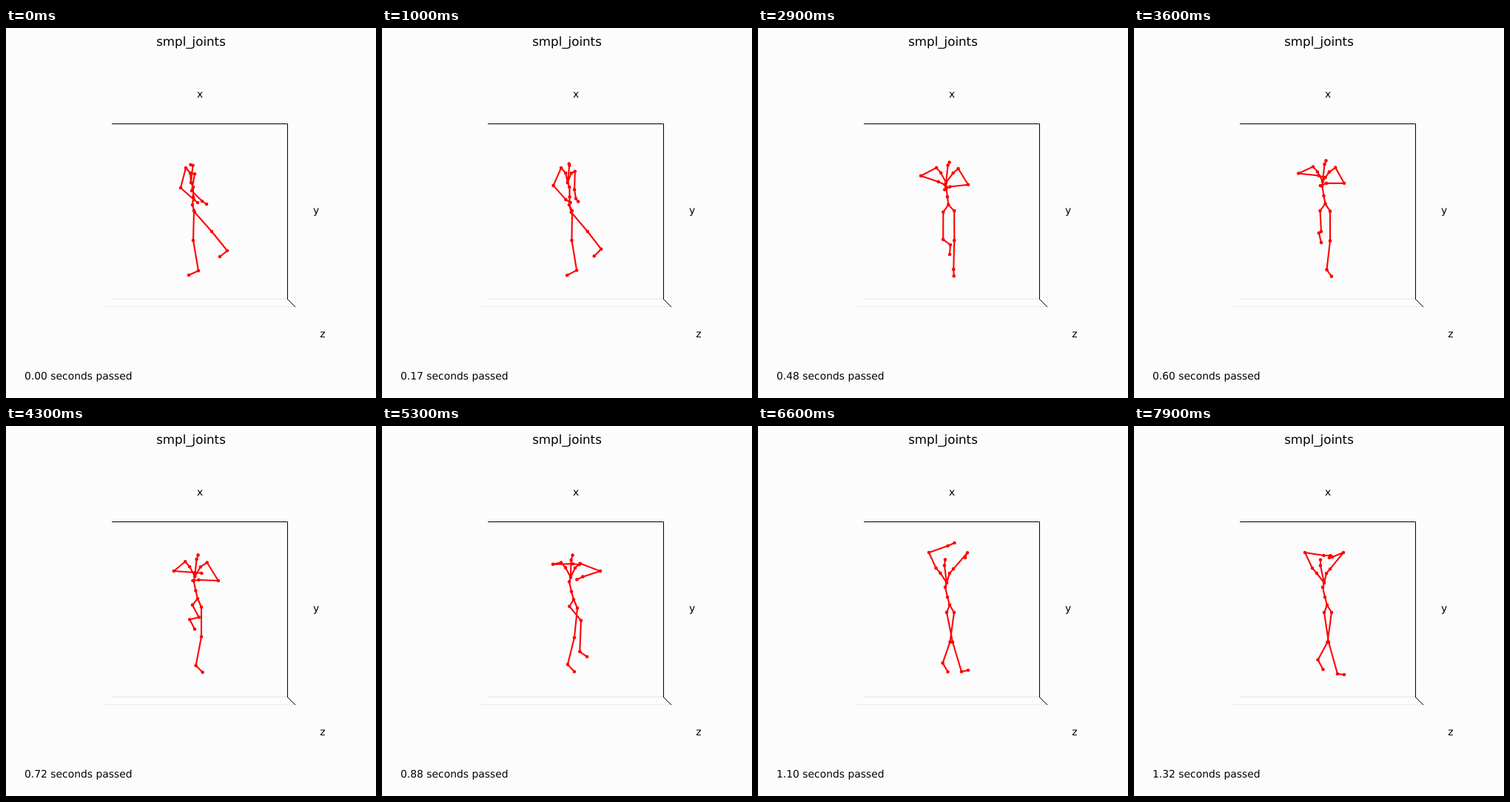
Write an HTML page that moves like this. It is 500 px wide and 500 px high and loops after 8 s.

```html
<!DOCTYPE html>
<html lang="en">
<head>
<meta charset="utf-8">
<title>smpl_joints</title>
<style>
  html, body { margin: 0; width: 100%; height: 100%; overflow: hidden; background: #fcfcfc; }
  svg { display: block; width: 500px; height: 500px; }
  text {
    font: 13.89px "DejaVu Sans", sans-serif;
    text-rendering: geometricPrecision;
    fill: #000;
    white-space: pre;
  }
  .mid { text-anchor: middle; }
  .title { font-size: 16.67px; }
  path { fill: none; }
  .bones { stroke: #f00; stroke-width: 2.08; stroke-linejoin: round; stroke-linecap: round; }
  .dots { stroke: #f00; stroke-width: 4.6; stroke-linecap: round; }
</style>
</head>
<body>
<svg viewBox="0 0 500 500">
  <path d="M143 366H380" stroke="#e2e2e2"/>
  <path d="M132 376.5H391" stroke="#ededed"/>
  <path d="M143 129.5H380.5V366M380 366L391 377" stroke="#000"/>
  <text class="mid title" x="250" y="24">smpl_joints</text>
  <text class="mid" x="262" y="94">x</text>
  <text class="mid" x="419" y="251">y</text>
  <text class="mid" x="428" y="418">z</text>
  <text id="clock" x="25" y="475">0.00 seconds passed</text>
  <path id="bones" class="bones"/>
  <path id="dots" class="dots"/>
</svg>
<script>
const STEP = 100, STEPS = 80;
let now = 0;

// Eased 0 to 1 between two steps, and a soft pulse around one step.
function ramp(from, to) {
  const u = Math.min(1, Math.max(0, (now - from) / (to - from)));
  return u * u * (3 - 2 * u);
}
const bump = (centre, width) => Math.exp(-(((now - centre) / width) ** 2));
const shift = ([x, y], dx, dy) => [x + dx, y + dy];

// The pelvis drifts right and rises with the raised knee; the back bends over it.
function spine() {
  const pelvis = [
    252 + 7 * ramp(0, 43) + 2 * ramp(66, 79),
    239 - 7 * bump(47, 9) + 3 * ramp(53, 66)
  ];
  const bend = ramp(0, 53);
  const chest = shift(pelvis, -2 - 2 * bend, -30);
  const neck = shift(chest, 2.5 - 7.5 * ramp(40, 79), -23.3);
  const head = shift(neck,
    -3 + 5 * ramp(0, 20) - 2 * ramp(53, 79),
    -1 - 7 * Math.min(1, now / 66));
  return [
    pelvis,
    shift(pelvis, 1 - 4 * bend, -10.7),
    shift(pelvis, 1 - 7 * bend, -24),
    chest, neck, head
  ];
}

// Shoulders follow the chest; elbows and wrists swing up overhead.
function leftArm(chest) {
  const collar = shift(chest, -1 - 6 * ramp(0, 29) - 3 * ramp(53, 79), -13);
  const elbow = [
    236 - 16 * ramp(0, 29) + 11 * ramp(29, 53),
    216 - 20 * ramp(0, 40) - 25 * ramp(44, 66)
  ];
  const wrist = [
    254 - 13 * ramp(0, 22) + 17 * ramp(22, 50) - 1.5 * ramp(50, 62),
    232 - 34 * ramp(9, 40) - 36 * ramp(45, 66) + 13 * ramp(67, 76)
  ];
  const hand = shift(wrist,
    5 + 4 * ramp(0, 29),
    4 - 3 * ramp(29, 43) - 5 * ramp(53, 66) + 4 * ramp(66, 76));
  return [collar, shift(collar, -6, -7), elbow, wrist, hand];
}

function rightArm(chest) {
  const collar = shift(chest, 10 * ramp(0, 20) - 7 * ramp(20, 79), -12.8);
  const shoulder = shift(collar, 5 + 4 * bump(41, 14), 1 - 7 * ramp(0, 20));
  const elbow = [
    251 + 33 * ramp(0, 29) + 11 * ramp(38, 53) - 12 * ramp(53, 66),
    220 - 11 * ramp(0, 43) - 38 * ramp(44, 67)
  ];
  const wrist = [
    265 - 6 * ramp(0, 20) + ramp(20, 40) + 20 * ramp(41, 63) - 12 * ramp(66, 79),
    234 - 26 * ramp(0, 43) - 31 * ramp(49, 66)
  ];
  const hand = shift(wrist,
    6 - 14 * ramp(0, 34) + 8 * ramp(53, 66) - 4 * ramp(66, 79),
    4 - 3 * bump(43, 6) - 3 * ramp(53, 66));
  return [collar, shoulder, elbow, wrist, hand];
}

// One leg lifts forward and plants; the other carries the weight, then trails.
function swingLeg(pelvis) {
  const hip = shift(pelvis, 3 - 10 * ramp(8, 30) + 3 * ramp(43, 66), 10 - 1.5 * bump(46, 9));
  const knee = [
    278 - 28 * ramp(9, 30) + 19 * ramp(30, 54) - 6 * ramp(53, 66),
    275 + 11 * ramp(15, 30) - 28 * ramp(30, 44) + 34 * ramp(49, 66)
  ];
  const ankle = [
    299 - 51 * ramp(5, 40) + 27 * ramp(42, 59),
    301 - 8 * ramp(0, 29) - 32 * ramp(29, 43) + 71 * ramp(42, 61) + 3 * ramp(66, 79)
  ];
  const foot = shift(ankle,
    -10 + 20 * ramp(5, 56) - ramp(56, 66),
    8 + 5 * ramp(0, 28) - 15 * ramp(43, 66) + 3 * ramp(66, 79));
  return [hip, knee, ankle, foot];
}

function standLeg(pelvis) {
  const hip = shift(pelvis,
    2 + 6 * ramp(0, 26) - 3 * ramp(29, 43) + ramp(53, 66),
    8 + 3.5 * ramp(26, 43) - 1.5 * ramp(53, 66));
  const knee = shift(hip, -1 + ramp(0, 20) - 5.5 * ramp(43, 58), 40);
  const ankle = shift(knee,
    7 - 16 * ramp(6, 52) - 4 * ramp(60, 79),
    41 - 2 * ramp(0, 29) - 15 * ramp(43, 79));
  const foot = shift(ankle,
    -13 + 22 * ramp(10, 43) - 2 * ramp(53, 66),
    6 + 3 * ramp(0, 29) + 4 * ramp(43, 79));
  return [hip, knee, ankle, foot];
}

const [clock, bones, dots] = ["clock", "bones", "dots"].map(id => document.getElementById(id));

function draw(step) {
  now = step;
  const back = spine(), pelvis = back[0], chest = back[3];
  const chains = [
    back,
    [chest, ...leftArm(chest)],
    [chest, ...rightArm(chest)],
    [pelvis, ...swingLeg(pelvis)],
    [pelvis, ...standLeg(pelvis)]
  ];
  bones.setAttribute("d", chains.map(c => "M" + c.join("L")).join(""));
  dots.setAttribute("d", chains.flat().map(p => `M${p}h0.01`).join(""));
  clock.textContent = (step / 60).toFixed(2) + " seconds passed";
}

function tick() {
  draw(Math.floor(performance.now() / STEP) % STEPS);
  requestAnimationFrame(tick);
}
tick();
</script>
</body>
</html>
```
